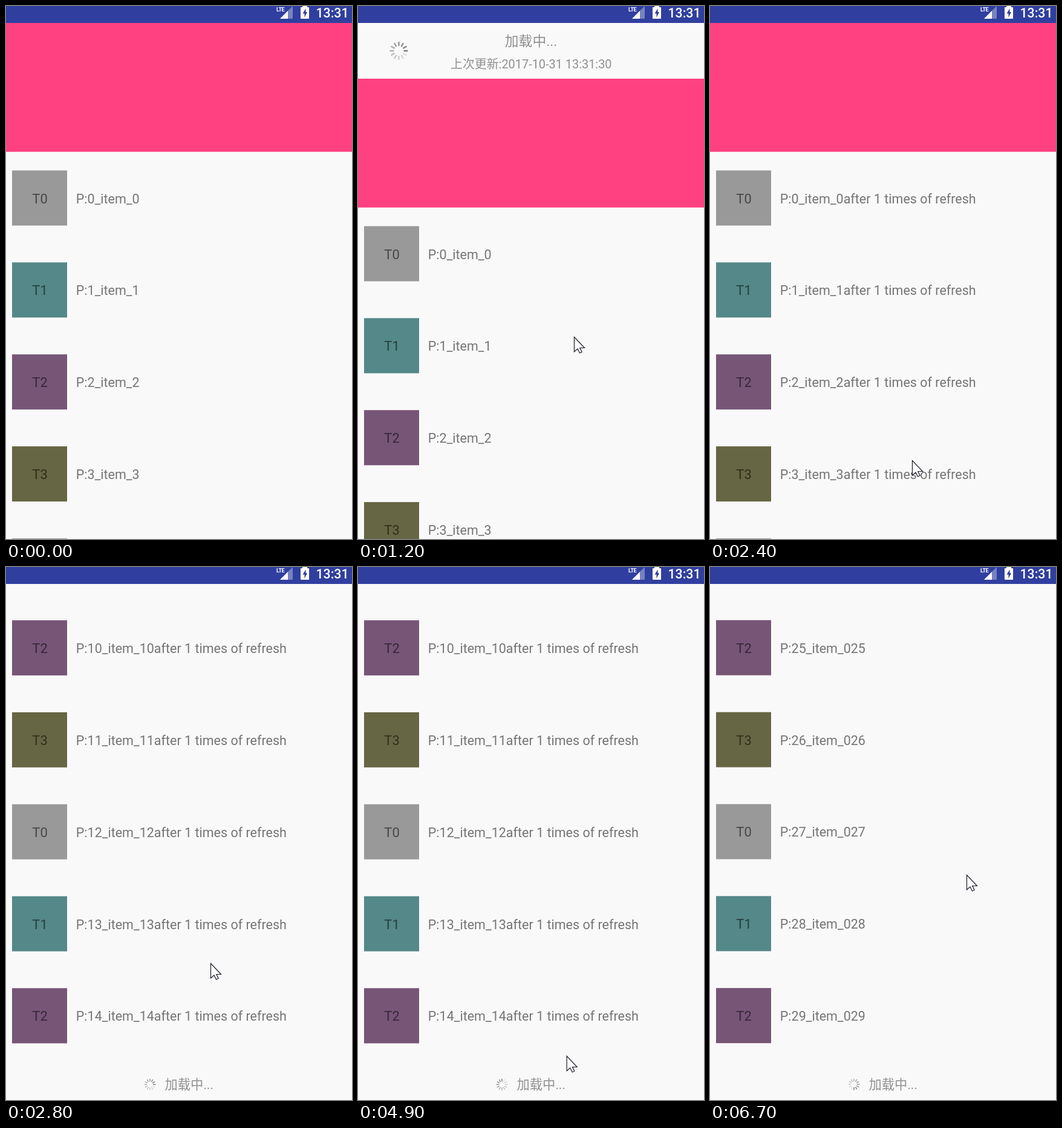
An HTML page that plays this animation: 572 by 880 pixels, repeating every 6.8 s.

```html
<!DOCTYPE html>
<html lang="zh">
<head>
<meta charset="utf-8">
<title>Pull to refresh</title>
<style>
  html, body { margin: 0; width: 100%; height: 100%; overflow: hidden; background: #f9f9f9; }
  svg { display: block; width: 572px; height: 880px; }
  text { font-family: Roboto, "Noto Sans CJK SC", "Noto Sans CJK", sans-serif; }
  .mid { text-anchor: middle; }
  .row text { font-size: 21.5px; fill: #757575; }
  .row .mid { font-size: 22px; fill: #000; fill-opacity: .54; }
  .hint { fill: #909090; }
  #title { font-size: 22.78px; }
  #date { font-size: 19.9px; }
  #footer { font-size: 21.26px; }
  .spin line { stroke: #707070; }
</style>
</head>
<body>
<svg viewBox="0 0 572 880">
  <rect width="572" height="880" fill="#f9f9f9"/>
  <g id="list">
    <text id="title" class="hint mid" x="286" y="-26.4"></text>
    <text id="date" class="hint mid" x="286.3" y="10.6">上次更新:2017-10-31 13:31:30</text>
    <path id="arrow" fill="#a9a9a9" d="M0-22 16-5H7V8H-7V-5H-16ZM-7 10H7V14H-7ZM-7 17H7V21H-7Z"/>
    <g id="headSpin" class="spin"></g>
    <rect y="28" width="572" height="212.7" fill="#ff4081"/>
    <g id="rows"></g>
    <g id="footer">
      <text id="fail" class="hint" x="194.5" y="8">加载失败，点击重试!</text>
      <g id="more">
        <g id="footSpin" class="spin"></g>
        <text class="hint" x="262.5" y="8">加载中...</text>
      </g>
    </g>
  </g>
  <rect width="572" height="28" fill="#303f9f"/>
  <g fill="#fff">
    <path d="M453 21 474 0V21Z" fill-opacity=".35"/>
    <path d="M453 21 466 8V21Z"/>
    <text x="447" y="8.5" font-size="9" font-weight="700" letter-spacing="-.5">LTE</text>
    <path d="M490 0H498V2H501V21H487V2H490Z"/>
    <path d="M495.5 4 490.5 12.5H493.5V19L498 10H495.5Z" fill="#303f9f"/>
    <text x="512.5" y="19" font-size="21.3" font-weight="500">13:31</text>
  </g>
  <path id="cursor" d="M.5.5V25L6 20 9.5 27 13.2 25.3 9.8 18.5H17.5Z" fill="#fff" stroke="#1c1c28" stroke-width="1.2"/>
</svg>
<script>
const LOOP = 6800, STEP = 100, PITCH = 151.85, FIRST = 271.5, PAGE = 15;
const COLORS = ['#999999', '#558888', '#775577', '#666644'];
const $ = id => document.getElementById(id);

// Tracks: [time, value, ...], linear between points.
const PULL = [[0, 0], [200, 16], [300, 39], [600, 125], [800, 188], [900, 188],
  [1000, 150], [1100, 110], [1200, 92], [1900, 92], [2000, 73], [2100, 22], [2200, 0]];
const SCROLL = [[2400, 0], [2500, 140], [2600, 620], [2700, 1240], [2800, 1702],
  [5600, 1702], [5700, 1770], [5800, 1990], [5900, 2280], [6300, 3980]];
const TURN = [[600, 180], [800, 10], [900, 0]];
const POINTER = [[100, 341, 440], [800, 336, 733], [900, 336, 733], [1000, 342, 706],
  [1100, 356, 590], [1200, 357, 546], [1700, 357, 560], [2300, 334, 750], [2400, 334, 750],
  [2800, 338, 654], [2900, 338, 654], [3500, 340, 706], [3900, 340, 706], [4300, 304, 853],
  [4500, 304, 853], [5100, 365, 784], [5500, 394, 733], [5600, 394, 733],
  [5700, 394, 690], [6400, 424, 508]];

function at(track, t) {
  const n = track.findIndex(p => p[0] > t);
  if (n === 0) return track[0].slice(1);
  if (n < 0) return track[track.length - 1].slice(1);
  const a = track[n - 1], b = track[n], k = (t - a[0]) / (b[0] - a[0]);
  return a.slice(1).map((v, i) => v + (b[i + 1] - v) * k);
}

const move = (el, x, y, turn = 0) =>
  el.setAttribute('transform', `translate(${x} ${y}) rotate(${turn})`);
const show = (el, on) => el.setAttribute('visibility', on ? 'visible' : 'hidden');

function addSpokes(el, inner, outer, width) {
  for (let i = 0; i < 12; i++)
    el.insertAdjacentHTML('beforeend', `<line y1="${-inner}" y2="${-outer}" stroke-width="${width}"
      opacity="${0.2 + i * 0.065}" transform="rotate(${i * 30})"/>`);
}

function addRow(i) {
  const kind = i % PAGE % 4;
  $('rows').insertAdjacentHTML('beforeend', `<g class="row" transform="translate(0 ${FIRST + i * PITCH})">
    <rect x="10" width="91" height="91" fill="${COLORS[kind]}"/>
    <text class="mid" x="56" y="54">T${kind}</text>
    <text class="label" x="115.8" y="54"></text></g>`);
}

for (let i = 0; i < PAGE * 2; i++) addRow(i);
addSpokes($('headSpin'), 8, 15, 2.4);
addSpokes($('footSpin'), 4.8, 9.5, 1.5);
const rows = [...document.querySelectorAll('.row')];
const labels = [...document.querySelectorAll('.label')];

function draw(t) {
  const [pull] = at(PULL, t), [scroll] = at(SCROLL, t), [turn] = at(TURN, t);
  const loading = t >= 1000, failed = t >= 3600 && t < 4500;
  const count = t >= 5200 ? PAGE * 2 : PAGE;
  const suffix = t >= 1900 ? 'after 1 times of refresh' : '';
  const spin = t / STEP * 30 % 360;

  move($('list'), 0, pull - scroll);
  $('title').textContent = loading ? '加载中...' : t < 600 ? '下拉可以刷新' : '松开可以刷新';
  show($('arrow'), !loading);
  show($('headSpin'), loading);
  move($('arrow'), 67.5, -17, turn);
  move($('headSpin'), 67.5, -18, spin + 120);

  rows.forEach((row, i) => {
    show(row, i < count);
    labels[i].textContent = `P:${i}_item_` + (i < PAGE ? i + suffix : '0' + i);
  });

  move($('footer'), 0, FIRST + (count - 1) * PITCH + 159);
  show($('fail'), failed);
  show($('more'), !failed);
  move($('footSpin'), 238, 0, spin);

  move($('cursor'), ...at(POINTER, t));
  show($('cursor'), t >= 100 && (t < 5800 || t >= 6400));
}

let last = -1;
function tick() {
  const t = Math.floor(performance.now() % LOOP / STEP) * STEP;
  if (t !== last) draw(last = t);
  requestAnimationFrame(tick);
}
tick();
</script>
</body>
</html>
```
